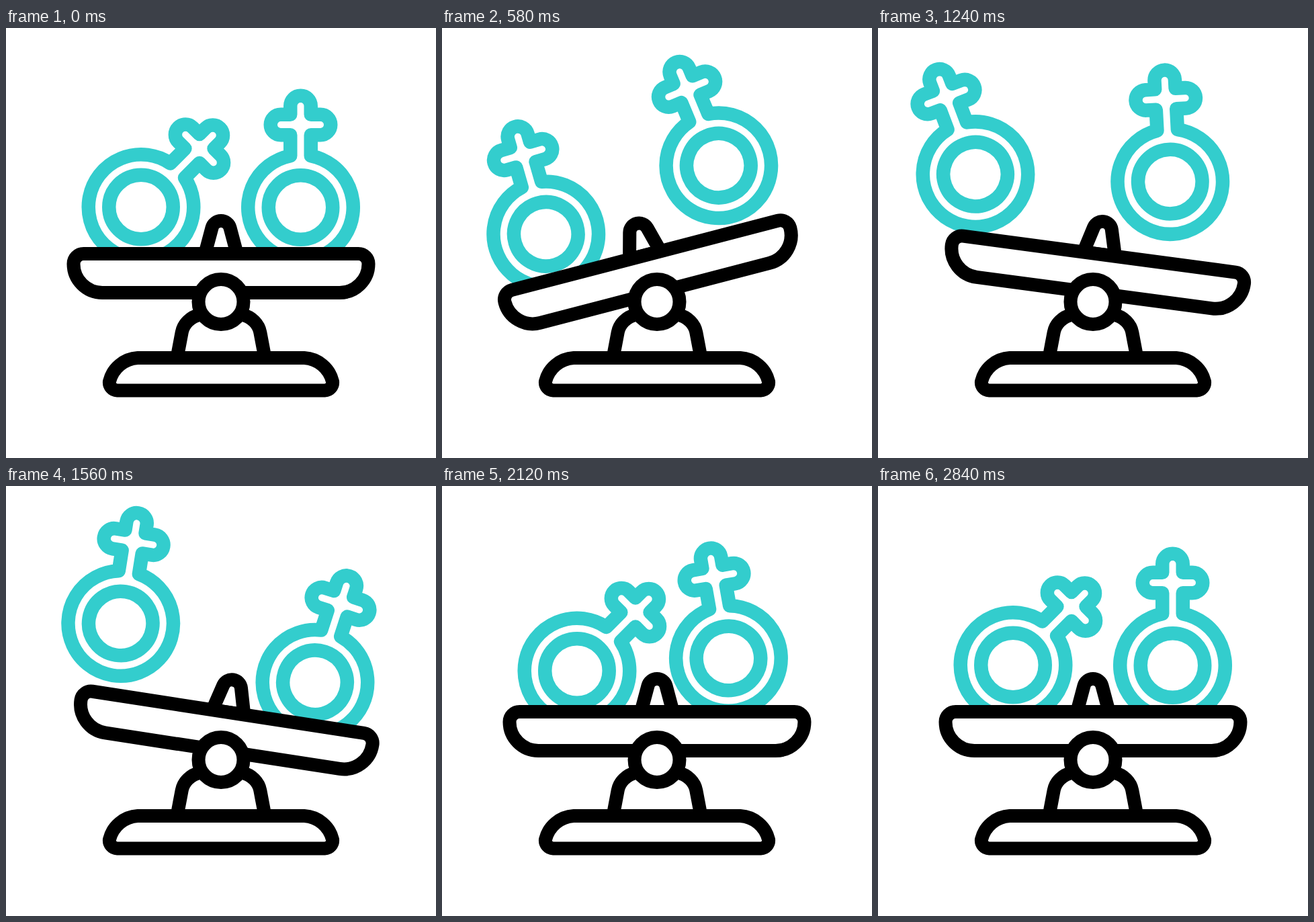
Recreate the animation shown at these times as an HTML page. Size 640 by 640 pixels, loop 3600 ms.

```html
<!DOCTYPE html>
<html lang="en">
<head>
<meta charset="utf-8">
<title>Balance</title>
<style>
  html, body { margin: 0; width: 100%; height: 100%; overflow: hidden; background: #fff; }
  svg { display: block; width: 100%; height: 100%; }
  .ink { fill: #fff; stroke: #000; stroke-width: 20; stroke-linecap: round; stroke-linejoin: round; }
  .teal { fill: none; stroke: #33cdcd; stroke-width: 20.5; stroke-linejoin: round; }
</style>
</head>
<body>
<svg viewBox="0 0 640 640">
  <defs>
    <g id="symbol" class="teal">
      <circle r="47.75"/>
      <path d="M-15.25-76.75V-107.75H-29.5a15.25 15.25 0 0 1 0-30.5H-15.25V-151a15.25 15.25 0 0 1 30.5 0V-138.25H29.5a15.25 15.25 0 0 1 0 30.5H15.25V-76.75A78.25 78.25 0 1 1-15.25-76.75z"/>
    </g>
    <path id="leg" d="M254.7 490L261.7 453C264 441 274 430 289 426.5"/>
  </defs>
  <use id="left" href="#symbol"/>
  <use id="right" href="#symbol"/>
  <g id="beam" class="ink">
    <path d="M296.2 336L306.5 297.4a14 14 0 0 1 27 0L343.8 336z"/>
    <path d="M115.5 336H524.5a15 15 0 0 1 15 15a43 43 0 0 1-43 43H143.5a43 43 0 0 1-43-43a15 15 0 0 1 15-15z"/>
  </g>
  <g class="ink">
    <path d="M165.5 539.5H474.5A12 12 0 0 0 486 526A46 46 0 0 0 444 491H196A46 46 0 0 0 154 526A12 12 0 0 0 165.5 539.5z"/>
    <g fill="none">
      <use href="#leg"/>
      <use href="#leg" transform="translate(640) scale(-1 1)"/>
    </g>
    <circle cx="320" cy="407.5" r="33.5"/>
  </g>
</svg>
<script>
const LOOP = 3600, FOOT = 69.5;
const [left, right, beam] = ["left", "right", "beam"].map(id => document.getElementById(id));

const pose = (el, x, y, angle) =>
  el.setAttribute("transform", `translate(${x} ${y}) rotate(${angle})`);

function draw(now) {
  const t = now % LOOP;
  // Eased move by an amount between two times.
  const move = (amount, from, to) => {
    const s = Math.min(1, Math.max(0, (t - from) / (to - from)));
    return amount * s * s * (3 - 2 * s);
  };

  const tilt = move(-16.8, 0, 750) + move(26.8, 800, 1340) + move(-10, 1400, 2120);
  beam.setAttribute("transform", `rotate(${tilt} 320 407)`);

  pose(left,
    201 + move(-56, 0, 790) + move(-17, 800, 1040) + move(73, 830, 2140),
    266.5 + move(65, 0, 1000) + move(-142, 840, 1400) + move(85.5, 1400, 2000) + move(-8.5, 2120, 2840),
    45 + move(-75, 0, 800) + move(75, 1000, 2090));

  // The right symbol swings about its foot.
  const swing = move(-36.5, 0, 1000) + move(54.5, 900, 1490) + move(-28, 1560, 2120) + move(10, 2120, 2700);
  const lift = move(-90, 0, 860) + move(113, 920, 1600) + move(-34.6, 1600, 2120) + move(11.6, 2120, 2700);
  const rad = swing * Math.PI / 180;
  pose(right, 438.5 + FOOT * Math.sin(rad), 336.5 + lift - FOOT * Math.cos(rad), swing);
}

let start;
function tick(now) {
  start ??= now;
  draw(now - start);
  requestAnimationFrame(tick);
}
draw(0);
requestAnimationFrame(tick);
</script>
<style>
  #leg { fill: none; }
</style>
</body>
</html>
```
